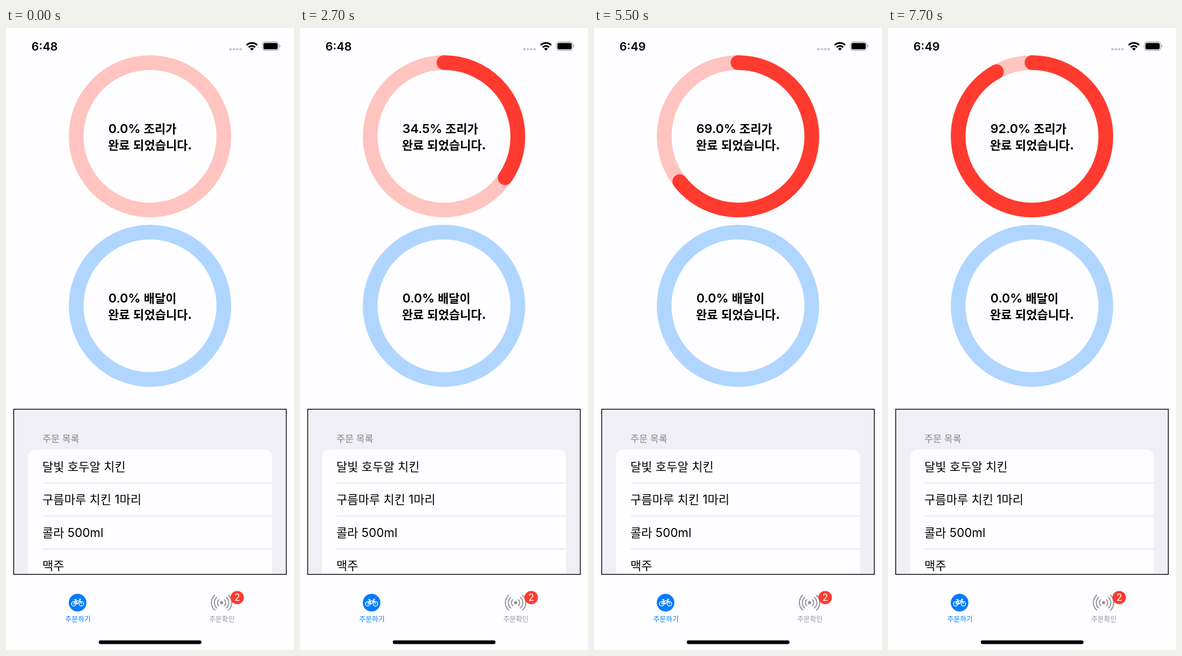
Recreate the animation shown at these times as an HTML page. Size 509 by 1101 pixels, loop 8 s.

```html
<!DOCTYPE html>
<html lang="ko">
<head>
<meta charset="utf-8">
<title>주문 현황</title>
<style>
  html, body { margin: 0; width: 100%; height: 100%; overflow: hidden; background: #fefdff; }
  svg { display: block; width: 509px; height: 1101px; }
  text { font-family: Inter, "Noto Sans CJK KR", "Noto Sans CJK", sans-serif; font-size: 22px; fill: #000; }
  .ko { font-family: "Noto Sans CJK KR", "Noto Sans CJK", sans-serif; font-size: 21px; }
  .note { font-weight: 600; }
  .clock { font-size: 20.5px; font-weight: 600; }
  .head { font-size: 16.4px; fill: #86848a; }
  .unit { font-family: Inter, sans-serif; font-size: 21.3px; }
  .tab { font-size: 12.2px; font-weight: 500; text-anchor: middle; }
  .ring { fill: none; stroke-width: 26; }
  .line { fill: none; stroke-linecap: round; stroke-linejoin: round; }
</style>
</head>
<body>
<svg viewBox="0 0 509 1101">
  <defs>
    <clipPath id="panel"><rect x="14" y="675" width="481" height="291.5"/></clipPath>
    <g id="waves">
      <path d="M5 -5.3A7.3 7.3 0 0 1 5 5.3M8.7 -9.3A12.7 12.7 0 0 1 8.7 9.3M12.3 -13.1A18 18 0 0 1 12.3 13.1"/>
    </g>
  </defs>

  <!-- status bar -->
  <text class="clock" id="clock" x="45" y="40">6:48</text>
  <g fill="#c9c7cb">
    <circle cx="396.7" cy="37.5" r="2.3"/><circle cx="402.7" cy="37.5" r="2.3"/>
    <circle cx="408.6" cy="37.5" r="2.3"/><circle cx="414.6" cy="37.5" r="2.3"/>
  </g>
  <g fill="none" stroke="#000" stroke-width="3">
    <path d="M425.3 30.3A13.2 13.2 0 0 1 444 30.3"/>
    <path d="M428.9 34.1A8.1 8.1 0 0 1 440.4 34.1"/>
  </g>
  <path d="M434.65 40L431.3 36.6A4.8 4.8 0 0 1 438 36.6Z"/>
  <rect x="453.1" y="24.6" width="29" height="15" rx="4.6" fill="none" stroke="#a5a3a7" stroke-width="1.2"/>
  <rect x="455" y="26.5" width="25.2" height="11.2" rx="2.8"/>
  <path d="M483.4 29.6a2.7 2.7 0 0 1 0 5z" fill="#a5a3a7"/>

  <!-- progress rings -->
  <circle class="ring" cx="254.5" cy="191.7" r="130.5" stroke="#ffc4c0"/>
  <circle class="ring" id="bar" cx="254.5" cy="191.7" r="130.5" stroke="#ff3b30" stroke-linecap="round"
    pathLength="100" stroke-dasharray="0 200" visibility="hidden" transform="rotate(-90 254.5 191.7)"/>
  <circle class="ring" cx="254.5" cy="491.7" r="130.5" stroke="#b0d6ff"/>
  <g class="note">
    <text x="181" y="186"><tspan id="cooked">0.0%</tspan> <tspan class="ko">조리가</tspan></text>
    <text class="ko" x="180.3" y="214.5">완료 되었습니다.</text>
    <text x="181" y="486">0.0% <tspan class="ko">배달이</tspan></text>
    <text class="ko" x="180.3" y="514.5">완료 되었습니다.</text>
  </g>

  <!-- order list -->
  <g clip-path="url(#panel)">
    <rect x="14" y="675" width="481" height="292" fill="#f1eff6"/>
    <text class="ko head" x="64.6" y="733">주문 목록</text>
    <rect x="39" y="746.3" width="431" height="260" rx="13" fill="#fefdff"/>
    <path d="M65 805.2H470M65 863.8H470M65 922.4H470" stroke="#dbd9de" stroke-width="1.1"/>
    <text class="ko" x="64.3" y="783.5">달빛 호두알 치킨</text>
    <text class="ko" x="64.3" y="842.3">구름마루 치킨 <tspan class="unit">1</tspan>마리</text>
    <text class="ko" x="64.3" y="901">콜라 <tspan class="unit">500ml</tspan></text>
    <text class="ko" x="64.3" y="959.3">맥주</text>
  </g>
  <rect x="13.6" y="674.8" width="481.8" height="292.4" fill="none" stroke="#000" stroke-width="1.4"/>

  <!-- tab bar -->
  <circle cx="126.5" cy="1017.2" r="15.6" fill="#057aff"/>
  <g class="line" stroke="#fefdff" stroke-width="1.4">
    <circle cx="119.7" cy="1019.2" r="4"/><circle cx="133.3" cy="1019.2" r="4"/>
    <path d="M119.7 1019.2L123 1014H130.6L126 1019.4H119.7M126 1019.4L122.3 1011.6M120.8 1011.6H124M133.3 1019.2L129.8 1011.2H132.3"/>
  </g>
  <text class="ko tab" x="127.2" y="1051" style="fill:#057aff">주문하기</text>
  <g class="line" transform="translate(381 1017.2)" stroke="#97959a" stroke-width="2">
    <use href="#waves"/><use href="#waves" transform="scale(-1 1)"/>
    <circle r="2.9" fill="#97959a" stroke="none"/>
  </g>
  <circle cx="408.6" cy="1008.2" r="11.8" fill="#ff3b30"/>
  <text x="408.6" y="1014.3" text-anchor="middle" style="font-size:16.8px;fill:#fff">2</text>
  <text class="ko tab" x="381.6" y="1051" style="fill:#97959a">주문확인</text>
  <rect x="164" y="1084" width="181.5" height="6.4" rx="3.2"/>
</svg>
<script>
  const LOOP = 8000, TICK = 100, FIRST = 300, PERIOD = 1000, EASE = 350, STEP = 11.5;
  const [clock, bar, cooked] = ['clock', 'bar', 'cooked'].map(id => document.getElementById(id));
  const ease = p => p * p * (3 - 2 * p);
  const put = (el, s) => { if (el.textContent !== s) el.textContent = s; };

  function draw(ms) {
    const t = Math.floor((ms % LOOP) / TICK + 1e-6) * TICK;
    const since = t - FIRST;
    const count = Math.max(0, Math.floor(since / PERIOD) + 1);
    let value = 0;
    if (count) {
      const p = Math.min(1, (since % PERIOD) / EASE);
      value = STEP * (count - 1 + ease(p));
    }
    put(cooked, (STEP * count).toFixed(1) + '%');
    put(clock, t < 5100 ? '6:48' : '6:49');
    bar.setAttribute('stroke-dasharray', value + ' 200');
    bar.setAttribute('visibility', value ? 'visible' : 'hidden');
  }

  const start = performance.now();
  function loop() {
    draw(performance.now() - start);
    requestAnimationFrame(loop);
  }
  loop();
</script>
</body>
</html>
```
